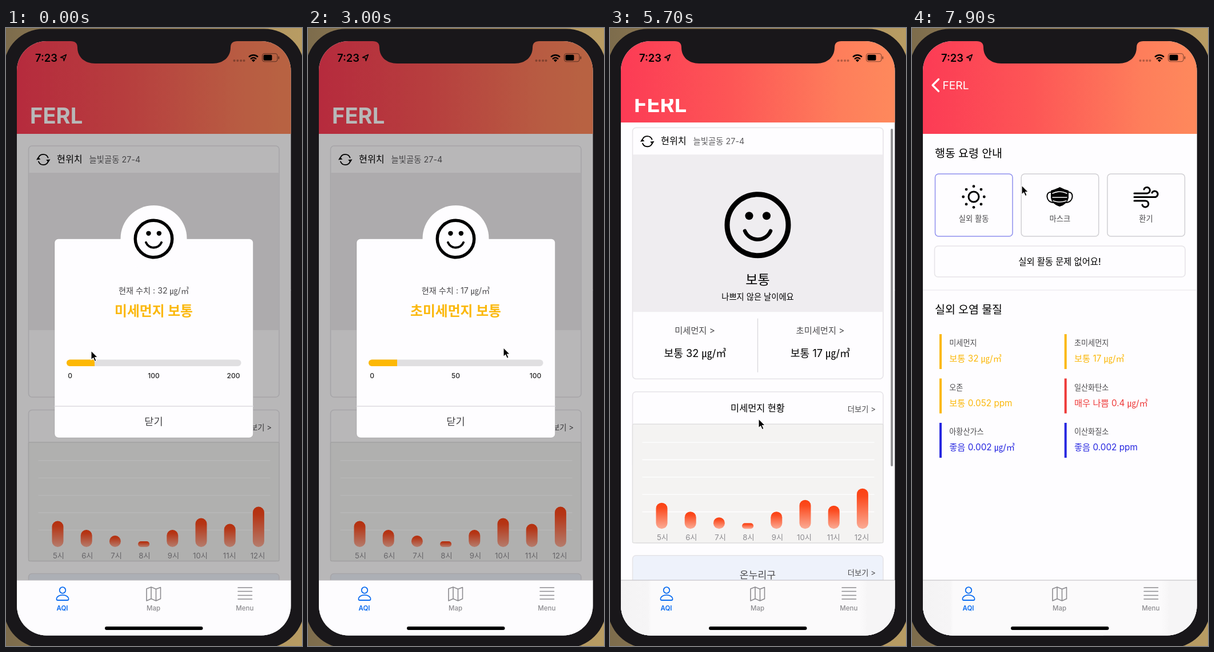
An HTML page that plays this animation: 518x1080 px, repeating every 8 s.

```html
<!DOCTYPE html>
<html lang="ko">
<head>
<meta charset="utf-8">
<title>Air quality app</title>
<style>
html, body { margin: 0; width: 100%; height: 100%; overflow: hidden; background: #19171a; }
svg { display: block; width: 518px; height: 1080px; }
text { font-family: Inter, 'Noto Sans CJK KR', 'Noto Sans CJK', sans-serif; white-space: pre; }
.line { fill: none; stroke-linecap: round; stroke-linejoin: round; }
</style>
</head>
<body>
<svg id="stage" viewBox="0 0 518 1080"></svg>
<script>
const YELLOW = '#fbb80c', RED = '#ee3a39', BLUE = '#2727e0', GRAY = '#8c8b8f', DARK = '#4b4a4d';
const BRAND = 'FERL';
const MID = 258.5, SCREEN_H = 1039;

const text = (x, y, str, size, fill = '#000', weight = 400, anchor = 'middle') =>
  `<text x="${x}" y="${y}" font-size="${size}" fill="${fill}" font-weight="${weight}" text-anchor="${anchor}">${str}</text>`;
const left = (x, y, str, size, fill, weight) => text(x, y, str, size, fill, weight, 'start');
const rect = (x, y, w, h, fill, r = 0, more = '') =>
  `<rect x="${x}" y="${y}" width="${w}" height="${h}" rx="${r}" fill="${fill}" ${more}/>`;
const line = (d, color, width, more = '') =>
  `<path class="line" d="${d}" stroke="${color}" stroke-width="${width}" ${more}/>`;
const dot = (x, y, r, fill = '#000') => `<circle cx="${x}" cy="${y}" r="${r}" fill="${fill}"/>`;
const card = (y, h, fill = '#fefdff') => rect(39.5, y, 438.5, h, fill, 6, 'stroke="#e6e4e8" stroke-width="1.6"');

const smiley = (y, scale) => `<g transform="translate(${MID} ${y}) scale(${scale})">
  <circle r="53.5" fill="none" stroke="#000" stroke-width="9"/>
  ${dot(-15, -16, 7)}${dot(15.5, -16, 7)}
  ${line('M-22.5 10.5A24.5 24.5 0 0 0 22.5 10.5', '#000', 6.5)}</g>`;

function homePage() {
  const heights = [45.5, 30, 20, 10, 30, 50.5, 40.5, 70.5];
  const labelX = [92, 142.3, 193, 242.5, 293, 340, 391.3, 440.5];
  const grid = [756, 786.3, 816.6, 847, 877.3].map(y => line(`M57 ${y}H462`, '#fff', 1.3)).join('');
  const bars = heights.map((h, i) =>
    rect(80.5 + i * 50.2, 907 - h, 20, h, 'url(#bar)', Math.min(10, h / 2)) +
    text(labelX[i], 927, `${i + 5}시`, 13.2, GRAY)).join('');
  return card(206, 439) +
    line('M56.5 227.5A9 9 0 0 1 73.5 226.5M74 232.5A9 9 0 0 1 57 233.5', '#000', 1.9) +
    '<path d="M53 230.5L56 225.5 60.500 229.500ZM77.500 229.500L74.500 234.500 70 230.500Z"/>' +
    left(89, 235.3, '현위치', 16.2, '#000', 500) +
    left(145.5, 234.5, '늘빛골동 27-4', 14.4, '#5e5d60') +
    rect(40, 253, 437.5, 275, '#efedf0') + smiley(376, 1) +
    text(MID, 480, '보통', 23, '#000', 500) +
    text(MID, 506.5, '나쁘지 않은 날이에요', 14.3) +
    line('M258.500 540V633', '#d9d8db', 1.3) +
    text(148.5, 566, '미세먼지 &gt;', 15.3, DARK) + text(368, 566, '초미세먼지 &gt;', 15.3, DARK) +
    text(149, 607, '보통 32 ㎍/㎥', 18.2) + text(368, 607, '보통 17 ㎍/㎥', 18.2) +
    card(667.5, 264) + text(MID, 702, '미세먼지 현황', 16.4, '#000', 500) +
    text(465, 702.5, '더보기 &gt;', 13.3, DARK, 400, 'end') +
    rect(39.5, 724, 438.5, 207.5, '#f4f3f2', 2, 'stroke="#e0dfe0" stroke-width="1.4"') + grid + bars +
    card(953.5, 200, '#eef2fb') + text(MID, 993.5, '온누리구', 17.2, DARK) +
    text(465, 988.5, '더보기 &gt;', 13.3, DARK, 400, 'end');
}

const sun = () => {
  let s = '<circle cx="108" cy="295" r="9" fill="none" stroke="#000" stroke-width="3"/>';
  for (let i = 0; i < 8; i++) {
    const a = i * Math.PI / 4;
    s += dot(108 + 18.3 * Math.cos(a), 295 + 18.3 * Math.sin(a), 2.4);
  }
  return s;
};
const mask = () =>
  line('M244 287C233 285 234 305 247 305M273 287C284 285 283 305 270 305', '#000', 2) +
  '<path d="M243 284Q251 282 258.500 278Q266 282 274 284V297Q272 308 258.500 312Q245 308 243 297Z"/>' +
  line('M246 289Q258.500 283 271 289M246 296H271M247 302Q258.500 306 270 302', '#fff', 1.5);
const wind = () =>
  line('M389 289H411A5.300 5.300 0 1 0 406 282M389 295.500H426A5.300 5.300 0 1 0 420 288M389 302H408A5.500 5.500 0 1 1 403 309', '#000', 3);

function detailPage() {
  const tiles = [['실외 활동', sun], ['마스크', mask], ['환기', wind]].map(([name, icon], i) => {
    const x = 40.5 + i * 150.7;
    return rect(x, 255, 135.5, 109, '#fefdff', 6, `stroke="${i ? '#d0cfd3' : '#8f90ee'}" stroke-width="1.5"`) +
      icon() + text(x + 67.7, 338, name, 13.3, DARK);
  }).join('');
  const items = [
    ['미세먼지', '보통 32 ㎍/㎥', YELLOW], ['초미세먼지', '보통 17 ㎍/㎥', YELLOW],
    ['오존', '보통 0.052 ppm', YELLOW], ['일산화탄소', '매우 나쁨 0.4 ㎍/㎥', RED],
    ['아황산가스', '좋음 0.002 ㎍/㎥', BLUE], ['이산화질소', '좋음 0.002 ppm', BLUE],
  ].map(([name, value, color], i) => {
    const x = 48 + i % 2 * 218.7, y = 535 + (i >> 1) * 77.5;
    return rect(x, y, 4, 61, color) + left(x + 17.3, y + 20.3, name, 13.1, DARK) +
      left(x + 17.3, y + 48, value, 15.3, color);
  }).join('');
  return rect(19, 185, 480, 780, '#fefdff') + left(40, 225.5, '행동 요령 안내', 19.5, '#000', 500) + tiles +
    card(381, 54) + text(MID, 413.5, '실외 활동 문제 없어요!', 15.4, '#000', 500) +
    line('M19 458H498', '#eeedf0', 1.3) + left(40, 498.5, '실외 오염 물질', 19.5, '#000', 500) + items;
}

const modal = (id, name, value, max) => `<g id="modal${id}">
  ${rect(19, 22, 480, 1060, '#000', 0, 'opacity=".28"')}
  ${rect(85, 368.5, 347.5, 347.5, '#fefdff', 7, 'stroke="#000" stroke-opacity=".12"')}
  ${dot(MID, 368, 58, '#fefdff')}${smiley(368.5, 0.603)}
  ${text(MID, 464, `현재 수치 : ${value} ㎍/㎥`, 14.2, DARK)}
  ${text(MID, 503, `${name} 보통`, 23.8, YELLOW, 700)}
  ${rect(106, 579.5, 305.5, 11.5, '#e0dfe1', 5.7)}
  <g clip-path="url(#track)">${rect(106, 579, 0, 13, '#fdb805', 0, `id="fill${id}"`)}</g>
  ${text(112, 611.7, 0, 12, '#222', 500)}${text(MID, 611.7, max / 2, 12, '#222', 500)}${text(398, 611.7, max, 12, '#222', 500)}
  ${line('M85 661H432.500', '#dddce0', 1.3)}
  <g id="close${id}">${text(MID, 694.3, '닫기', 17.6, '#444346', 500)}</g></g>`;

const statusBar = () =>
  left(51, 58.5, '7:23', 18.4, '#000', 600) +
  line('M105.500 46.500L95.500 51.500 100.500 52.300 101.300 57.500Z', '#000', 1.5) +
  [399.5, 405.3, 411.1, 416.5].map(x => dot(x, 57, 2, 'rgba(0,0,0,.3)')).join('') +
  line('M425.800 50A10.500 10.500 0 0 1 440.200 50M428.800 53.600A6.200 6.200 0 0 1 437.200 53.600', '#000', 2.5) +
  '<path d="M433 59.500L430 56.300A4.300 4.300 0 0 1 436 56.300Z"/>' +
  rect(448.5, 44.8, 26.5, 14, 'none', 4, 'stroke="#000" stroke-opacity=".5" stroke-width="1.1"') +
  rect(450.5, 46.8, 15, 10, '#000', 2) + rect(476.5, 49.5, 1.7, 5, '#000', 1, 'opacity=".5"');

const tabBar = () =>
  rect(19, 965, 480, 98, '#fdfcfe') + rect(19, 965, 480, 98, 'url(#tabTint)', 0, 'id="tint"') +
  line('M19 965H498', '#bbb9bd', 1.2) +
  '<circle cx="99" cy="982.500" r="5.300" fill="none" stroke="#0b6cf0" stroke-width="1.800"/>' +
  line('M88.500 998C88.500 988.500 109.500 988.500 109.500 998Q109.500 1000 107.500 1000H90.500Q88.500 1000 88.500 998Z', '#0b6cf0', 1.8) +
  line('M246 980L254 977 262.500 980.500 270.500 977.500V997.500L262.500 1001 254 997.500 246 1001ZM254 977V997.500M262.500 980.500V1001', GRAY, 1.6) +
  [978, 984.5, 991.5, 998].map(y => line(`M406 ${y}H430.500`, GRAY, 1.5)).join('') +
  text(98.5, 1017.5, 'AQI', 11.5, '#0b6cf0', 600) + text(258, 1017.5, 'Map', 11.5, GRAY, 500) +
  text(417.8, 1017.5, 'Menu', 11.5, GRAY, 500) + rect(173, 1046, 171.5, 6, '#000', 3);

const gradient = (id, stops, vertical) =>
  `<linearGradient id="${id}" ${vertical ? 'x2="0" y2="1"' : ''}>` +
  stops.map(([at, color]) => `<stop offset="${at}" stop-color="${color}"/>`).join('') + '</linearGradient>';

document.getElementById('stage').innerHTML = `<defs>
  ${gradient('head', [[0, '#fc3b55'], [.4, '#fd5656'], [.8, '#fe7e5b'], [1, '#fe895c']])}
  ${gradient('bar', [[0, '#fb4112'], [.2, '#fb4a1e'], [1, '#fbac96']], true)}
  ${gradient('wall', [[0, '#7d6c4c'], [.5, '#a58c5c'], [1, '#b89c63']])}
  ${gradient('tabTint', [[0, '#f4f3f4'], [.1, '#f6f5f6'], [.11, '#fbfafb'], [.87, '#fbfafb'], [.9, '#f6f5f6'], [1, '#f6f5f6']])}
  <clipPath id="screen">${rect(19, 23, 479.5, 1038.5, '#000', 52)}</clipPath>
  <clipPath id="below">${rect(19, 124, 480, 80, '#000')}</clipPath>
  <clipPath id="track">${rect(106, 579.5, 305.5, 11.5, '#000', 5.7)}</clipPath>
</defs>
${rect(0, 0, 518, 1080, 'url(#wall)')}${rect(-4, 1.5, 526, 1082, '#19171a', 70)}
<g clip-path="url(#screen)">
  ${rect(19, 22, 480, 1040, '#fefdff')}
  <g id="home">${homePage()}</g><g id="detail">${detailPage()}</g>
  ${rect(491.3, 189, 3.8, 559, '#8d8c8f', 1.9, 'id="thumb"')}
  ${rect(19, 22, 480, 163, 'url(#head)', 0, 'id="header"')}
  <g clip-path="url(#below)"><g id="title">${left(42, 167, BRAND, 38.2, '#fff', 700)}</g></g>
  <g id="back">${line('M46.500 89.500L36 100 46.500 110.500', '#fff', 3.2)}${left(53.5, 107, BRAND, 19.2, '#fff')}</g>
  ${statusBar()}
  ${modal(1, '미세먼지', 32, 200)}${modal(2, '초미세먼지', 17, 100)}
  ${tabBar()}
</g>
<path fill="#19171a" d="M113 21V23Q125 23 125 34C125 51 138 62 156 62H362C380 62 393 51 393 34Q393 23 405 23V21Z"/>
<path id="cursor" d="M0 0V16L3.700 12.600 6.300 18.600 9 17.400 6.500 11.500H11.500Z" stroke="#fff" stroke-width="1.100"/>`;

const $ = id => document.getElementById(id);
const clamp = x => Math.min(1, Math.max(0, x));
const smooth = x => x * x * (3 - 2 * x);
const slide = x => 1 - (1 - clamp(x)) ** 4;
const ramp = (t, from, to) => clamp((t - from) / (to - from));
const set = (id, attrs) => { for (const k in attrs) $(id).setAttribute(k, attrs[k]); };
const move = (id, x, y) => set(id, { transform: `translate(${x} ${y})` });

// Eased interpolation through [time, ...values] keys.
function track(keys, t) {
  const n = keys.findIndex(k => k[0] > t);
  if (n === 0) return keys[0].slice(1);
  if (n < 0) return keys[keys.length - 1].slice(1);
  const a = keys[n - 1], b = keys[n], p = smooth(ramp(t, a[0], b[0]));
  return a.slice(1).map((v, i) => v + (b[i + 1] - v) * p);
}

const pointer = [
  [0, 149, 564], [100, 149, 564], [750, 262, 677], [1150, 262, 677], [1600, 342, 558.5], [3100, 342, 558.5],
  [3700, 260, 683], [5900, 260, 683], [6400, 440, 693], [7050, 440, 693], [7800, 192, 275],
];
const scrolling = [[4600, 0], [4900, 32], [5250, 56], [5450, 56], [6000, 0]];

function draw(t) {
  const [scroll] = track(scrolling, t);
  const fold = scroll * 20 / 32;
  const push = slide((t - 6700) / 550);

  move('home', -144 * push, -scroll);
  move('detail', 480 * (1 - push), 0);
  set('header', { height: 163 - fold });
  move('title', -60 * push, -fold);
  set('title', { opacity: 1 - clamp(push * 1.6) });
  move('back', 40 * (1 - push), 0);
  set('back', { opacity: push });
  set('thumb', {
    y: 189 - scroll * 13 / 32, height: 559 + scroll * 31 / 32,
    opacity: ramp(t, 4550, 4700) * (1 - ramp(t, 6550, 6750)),
  });

  const drop1 = slide((t - 1078) / 500);
  const drop2 = t < 3500 ? 1 - slide((t - 1747) / 500) : slide((t - 3900) / 500);
  [drop1, drop2].forEach((d, i) => {
    move('modal' + (i + 1), 0, d * SCREEN_H);
    set('modal' + (i + 1), { display: d < 1 ? 'inline' : 'none' });
  });
  set('fill1', { width: 49 + 11 * ramp(t, 0, 370) });
  set('fill2', { width: Math.min(62, Math.max(0, 17 + (t - 1900) * 0.03)) });
  set('close1', { opacity: t >= 900 ? 0.28 : 1 });
  set('close2', { opacity: t >= 3800 ? 0.28 : 1 });
  set('tint', { opacity: t >= 4300 ? 1 : 0 });
  move('cursor', ...track(pointer, t));
}

function tick() {
  draw(Math.floor(performance.now() % 8000 / 100) * 100);
  requestAnimationFrame(tick);
}
tick();
</script>
</body>
</html>
```
